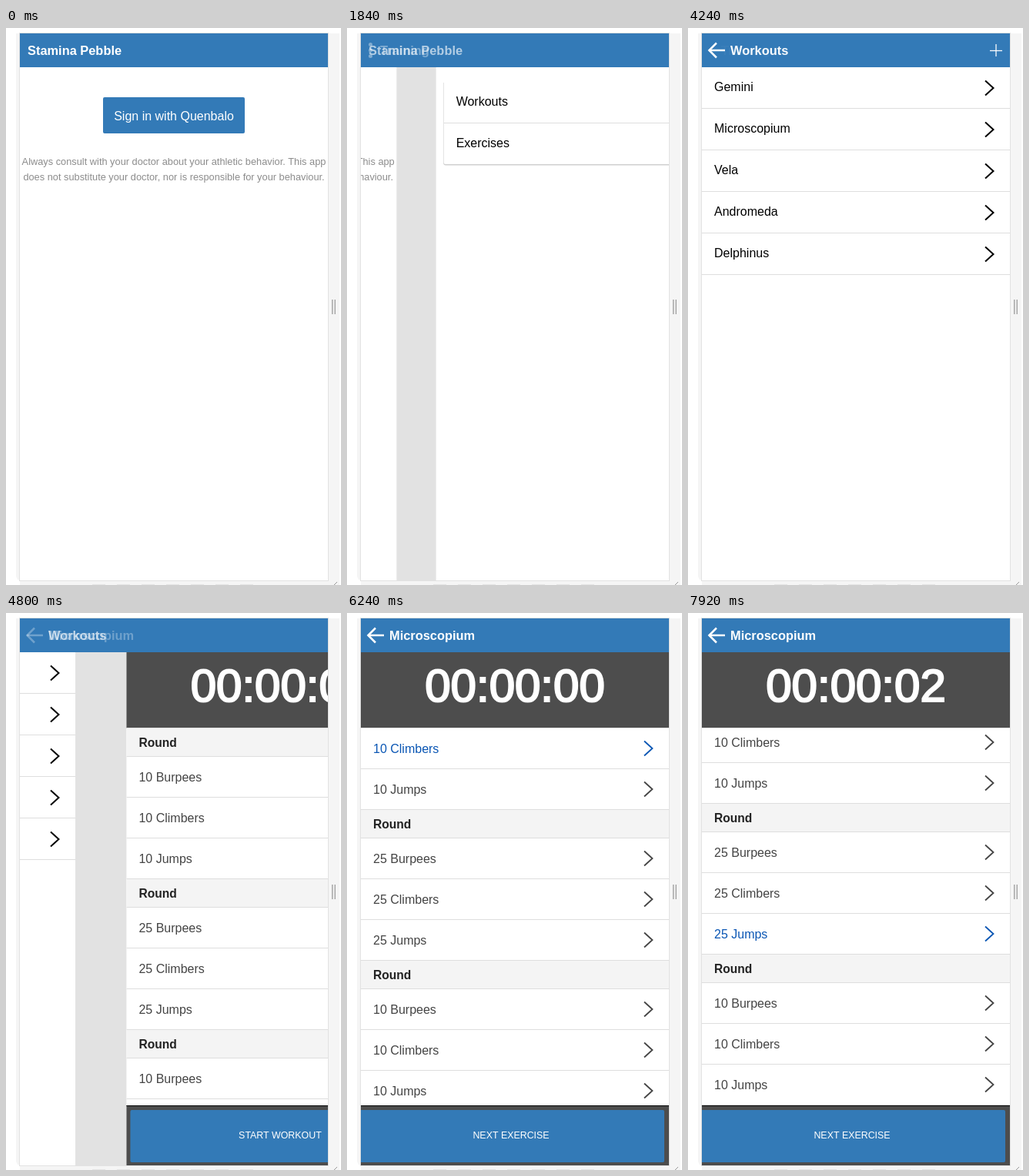
These frames come from a looping animation (435x724 px, 8 s). An HTML page with a canvas:

```html
<!DOCTYPE html>
<html lang="en">
<head>
<meta charset="utf-8">
<title>Workout app</title>
<style>
  html, body { margin: 0; width: 100%; height: 100%; overflow: hidden; background: #fff; }
  canvas { display: block; }
</style>
</head>
<body>
<canvas id="stage" width="435" height="724"></canvas>
<script>
const ctx = document.getElementById('stage').getContext('2d');
const LOOP = 8000, STEP = 80;
const SLIDE = 480, LEAD = 66, WIDTH = 400;
const FONT = '"Liberation Sans", Arial, sans-serif';
const BLUE = '#337ab7', PRESSED = '#286090', DARK = '#4d4d4d', LINE = '#dedede';
const ACTIVE = '#0a56b4', TOUCH = '#d9d9d9';

const clamp = v => Math.max(0, Math.min(1, v));
const easeOut = v => 1 - (1 - clamp(v)) ** 3;
const between = (t, from, to) => t >= from && t < to;

function rect(x, y, w, h, color, radius = 0) {
  ctx.fillStyle = color;
  ctx.beginPath();
  ctx.roundRect(x, y, w, h, radius);
  ctx.fill();
}

function text(str, x, y, size, color, { align = 'left', weight = '' } = {}) {
  ctx.font = `${weight} ${size}px ${FONT}`;
  ctx.textAlign = align;
  ctx.fillStyle = color;
  ctx.fillText(str, x, y);
}

function path(points, color, width) {
  ctx.strokeStyle = color;
  ctx.lineWidth = width;
  ctx.beginPath();
  points.forEach(([x, y]) => ctx.lineTo(x, y));
  ctx.stroke();
}

const chevron = (x, y, color, width) =>
  path([[x, y - 9.5], [x + 10.5, y], [x, y + 9.5]], color, width);

// Header icons
function menuIcon() {
  ctx.fillStyle = '#fff';
  for (const y of [21.5, 29, 36.5]) {
    ctx.beginPath();
    ctx.arc(30.5, y, 2.5, 0, 7);
    ctx.fill();
  }
}

function backIcon() {
  path([[27, 29], [48, 29]], '#fff', 2.5);
  path([[37, 19.5], [27.5, 29], [37, 38.5]], '#fff', 2.5);
}

function addIcon() {
  path([[392, 29.5], [408, 29.5]], '#fff', 1.3);
  path([[400, 21], [400, 37]], '#fff', 1.3);
}

// Screens
function login(t) {
  rect(126, 90, 184, 47, BLUE, 2);
  ctx.save();
  ctx.globalAlpha *= Math.sin(Math.PI * clamp((t - 340) / 400));
  rect(126, 90, 184, 47, PRESSED, 2);
  ctx.restore();
  text('Sign in with Quenbalo', 218, 120, 16, '#fff', { align: 'center' });
  const note = ['Always consult with your doctor about your athletic behavior. This app',
    'does not substitute your doctor, nor is responsible for your behaviour.'];
  note.forEach((s, i) => text(s, 218, 178 + i * 20, 12.8, '#8c8c8c', { align: 'center' }));
}

function training(t) {
  rect(27.5, 71, 381, 107.5, '#cfcfcf', [0, 0, 3, 3]);
  rect(28, 71, 380, 106, '#fff', [0, 0, 2, 2]);
  if (between(t, 3520, 3700)) rect(28, 71, 380, 52, TOUCH);
  rect(28, 123, 380, 1, LINE);
  ['Workouts', 'Exercises'].forEach((s, i) => {
    text(s, 44, 101 + i * 54, 16, '#000');
    chevron(375.5, 97 + i * 54, BLUE, 2);
  });
}

function workouts(t) {
  ['Gemini', 'Microscopium', 'Vela', 'Andromeda', 'Delphinus'].forEach((s, i) => {
    const y = 51 + i * 54;
    if (i === 1 && between(t, 4400, 4590)) rect(18, y, WIDTH, 53, TOUCH);
    text(s, 34, y + 31, 16, '#000');
    chevron(386, y + 27, '#000', 2);
    rect(18, y + 53, WIDTH, 1, LINE);
  });
}

const HEAD = 37, ROW = 53, MAX_SCROLL = 98;
const FIRST_TAP = 5760, TAP_GAP = 400, HOLD = 70, CLOCK_START = 5880;

function timer(t) {
  rect(18, 51, WIDTH, 98.5, DARK);
  const secs = Math.max(0, Math.floor((t - CLOCK_START) / 1000));
  const clock = '00:00:' + String(secs).padStart(2, '0');
  text(clock, 218, 115, 60, '#fff', { align: 'center' });
  ctx.strokeStyle = '#fff';
  ctx.lineWidth = 2.2;
  ctx.strokeText(clock, 218, 115);
}

function exercises(current) {
  const scroll = current < 0 ? 0
    : Math.min(MAX_SCROLL, HEAD + ROW * current + HEAD * Math.floor(current / 3));
  ctx.save();
  ctx.beginPath();
  ctx.rect(18, 149, WIDTH, 491);
  ctx.clip();
  rect(18, 149, WIDTH, 1, LINE);
  let y = 150 - scroll, index = 0;
  for (const reps of [10, 25, 10]) {
    rect(18, y, WIDTH, HEAD, '#f4f4f4');
    text('Round', 34, y + 24, 15.6, '#222', { weight: 'bold' });
    rect(18, y + HEAD - 1, WIDTH, 1, LINE);
    y += HEAD;
    for (const move of ['Burpees', 'Climbers', 'Jumps']) {
      const color = index++ === current ? ACTIVE : '#444';
      text(`${reps} ${move}`, 34, y + 32, 16, color);
      chevron(386, y + 26, color, 1.8);
      rect(18, y + ROW - 1, WIDTH, 1, LINE);
      y += ROW;
    }
  }
  ctx.restore();
}

function workout(t) {
  const current = Math.max(-1, Math.floor((t - FIRST_TAP - HOLD) / TAP_GAP));
  const started = current >= 0;
  const held = t >= FIRST_TAP && (t - FIRST_TAP) % TAP_GAP < HOLD;
  timer(t);
  exercises(current);
  rect(18, 640, WIDTH, 78, DARK);
  rect(18, 640, WIDTH, 1, '#000');
  const left = started ? 14 : 23;
  rect(left, 646, 412 - left, 68, held ? PRESSED : BLUE, 2);
  text(started ? 'NEXT EXERCISE' : 'START WORKOUT', (left + 412) / 2, 683, 12.4, '#fff', { align: 'center' });
}

const screens = [
  { draw: login, title: 'Stamina Pebble', x: 28, icons: [] },
  { draw: training, title: 'Training', x: 43, icons: [menuIcon] },
  { draw: workouts, title: 'Workouts', x: 55, icons: [backIcon, addIcon] },
  { draw: workout, title: 'Microscopium', x: 55, icons: [backIcon] }
];
const slides = [1660, 3777, 4657];

function page(screen, dx, t) {
  ctx.save();
  ctx.translate(dx, 0);
  rect(18, 7, WIDTH, 711, '#fff');
  screen.draw(t);
  ctx.restore();
}

function header(screen, alpha, withIcons = true) {
  ctx.save();
  ctx.globalAlpha = alpha;
  text(screen.title, screen.x, 35, 16.4, '#fff', { weight: 'bold' });
  if (withIcons) screen.icons.forEach(icon => icon());
  ctx.restore();
}

function surround() {
  rect(0, 0, 435, 724, '#fff');
  rect(13, 7, 420, 711, '#f5f5f5', [0, 0, 0, 6]);
  rect(18, 717, 415, 7, '#f5f5f5');
  for (let x = 112; x < 320; x += 32) rect(x, 723, 17, 1, '#e4e4e4');
  rect(17, 6, 402, 713, '#e2e2e2');
  for (const x of [423, 426.5]) rect(x, 353, 1.5, 19, '#a8a8a8');
  path([[426, 724], [430, 720]], '#999', 1);
}

function render(t) {
  surround();
  ctx.save();
  ctx.beginPath();
  ctx.rect(18, 7, WIDTH, 711);
  ctx.clip();

  const n = slides.filter(s => t >= s - LEAD).length;
  const start = slides[n - 1];
  const moving = n > 0 && t < start + SLIDE;
  const fade = moving ? clamp((t - start) / SLIDE) : 1;
  if (moving) page(screens[n - 1], -WIDTH * easeOut((t - start + LEAD) / SLIDE), t);
  page(screens[n], moving ? WIDTH * (1 - easeOut((t - start) / SLIDE)) : 0, t);

  rect(18, 7, WIDTH, 44, BLUE);
  if (moving) header(screens[n - 1], 1 - fade, false);
  header(screens[n], fade);
  ctx.restore();
}

const origin = performance.now();
function tick() {
  const t = (performance.now() - origin) % LOOP;
  render(Math.floor(t / STEP) * STEP);
  requestAnimationFrame(tick);
}
tick();
</script>
</body>
</html>
```
